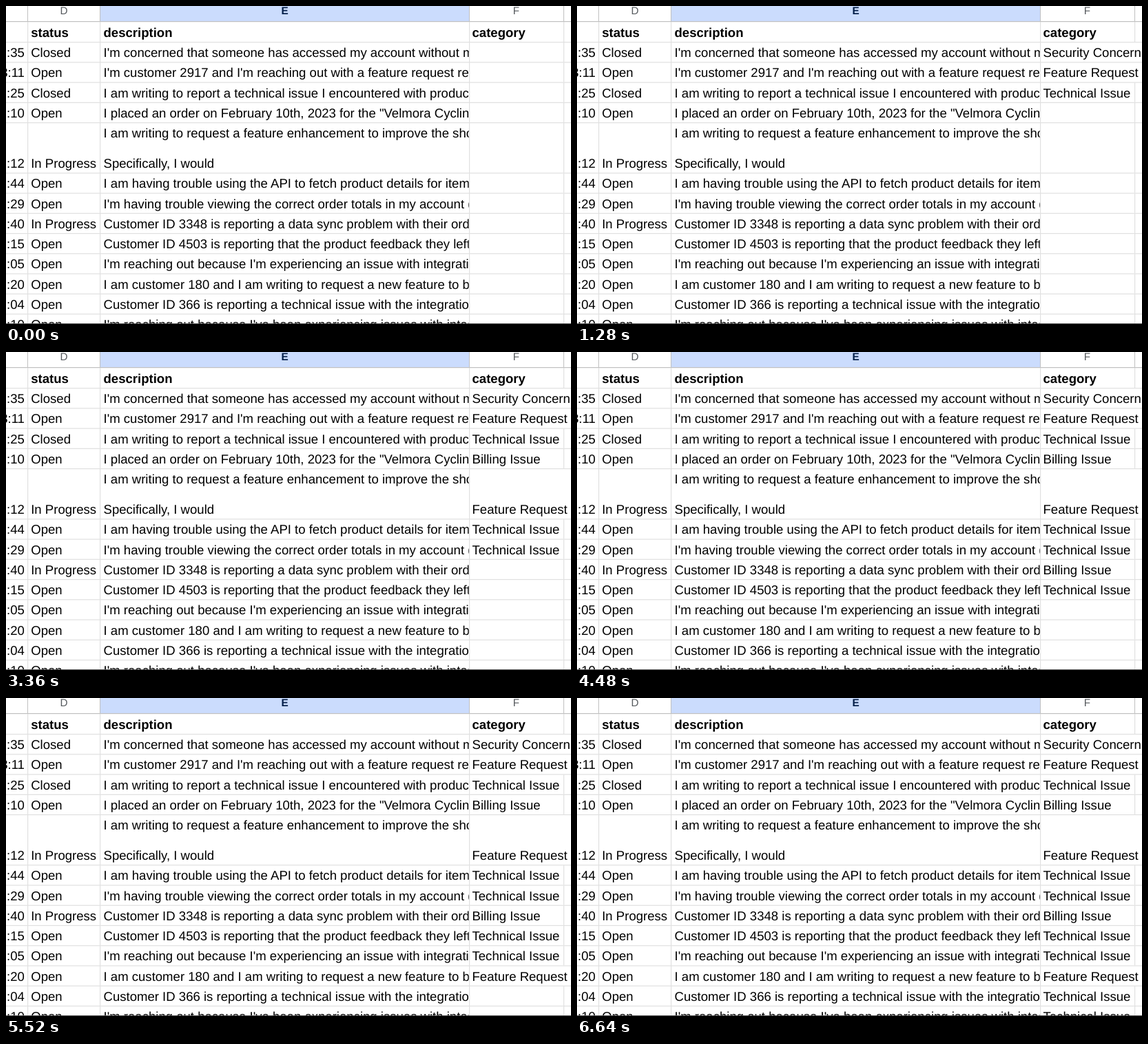
These frames come from a looping animation (820x462 px, 7680 ms). An HTML page:

```html
<!DOCTYPE html>
<html lang="en">
<head>
<meta charset="utf-8">
<title>Ticket categories</title>
<style>
  html, body { margin: 0; width: 100%; height: 100%; overflow: hidden; background: #fff; }
  svg { display: block; width: 820px; height: 462px; font: 18.57px "Liberation Sans", Arial, sans-serif; text-rendering: geometricPrecision; }
  .bold { font-weight: 700; }
  .letter { font-size: 15.3px; text-anchor: middle; fill: #575b5f; }
  .selected { font-weight: 700; fill: #041e49; }
</style>
</head>
<body>
<svg id="sheet" viewBox="0 0 820 462">
  <clipPath id="cellE"><rect x="137" width="534.7" height="462"/></clipPath>
</svg>
<script>
const LOOP = 7680, PITCH = 29.25, TALL = 73.2;
const COLUMNS = [31, 136, 672, 809];
const sheet = document.getElementById('sheet');

// time, status, [description lines], category, moment the category appears
const tickets = [
  [':35', 'Closed', ["I'm concerned that someone has accessed my account without my"], 'Security Concern', 80],
  ['3:11', 'Open', ["I'm customer 2917 and I'm reaching out with a feature request related"], 'Feature Request', 640],
  [':25', 'Closed', ['I am writing to report a technical issue I encountered with product'], 'Technical Issue', 1280],
  [':10', 'Open', ['I placed an order on February 10th, 2023 for the "Velmora Cycling'], 'Billing Issue', 1760],
  [':12', 'In Progress', ['I am writing to request a feature enhancement to improve the shopping', 'Specifically, I would'], 'Feature Request', 2320],
  [':44', 'Open', ['I am having trouble using the API to fetch product details for item'], 'Technical Issue', 2800],
  [':29', 'Open', ["I'm having trouble viewing the correct order totals in my account dashboard"], 'Technical Issue', 3360],
  [':40', 'In Progress', ['Customer ID 3348 is reporting a data sync problem with their order'], 'Billing Issue', 3920],
  [':15', 'Open', ['Customer ID 4503 is reporting that the product feedback they left'], 'Technical Issue', 4480],
  [':05', 'Open', ["I'm reaching out because I'm experiencing an issue with integrating"], 'Technical Issue', 4960],
  [':20', 'Open', ['I am customer 180 and I am writing to request a new feature to better'], 'Feature Request', 5520],
  [':04', 'Open', ['Customer ID 366 is reporting a technical issue with the integration'], 'Technical Issue', 6080],
  [':10', 'Open', ["I'm reaching out because I've been experiencing issues with integrating"], 'Technical Issue', 6640]
];

function add(tag, attrs, content = '') {
  const node = document.createElementNS('http://www.w3.org/2000/svg', tag);
  for (const name in attrs) node.setAttribute(name, attrs[name]);
  node.textContent = content;
  return sheet.appendChild(node);
}
const box = (x, y, width, height, fill) => add('rect', { x, y, width, height, fill });
const label = (x, y, content, attrs) => add('text', { x, y, ...attrs }, content);

// Column letters
box(137, 0, 535, 22, '#cbdcfd');
COLUMNS.forEach(x => box(x, 0, 1, 22, '#c0c0c0'));
box(0, 22, 820, 1.2, '#c0c0c0');
label(84, 11.6, 'D', { class: 'letter' });
label(404.5, 11.6, 'E', { class: 'letter selected' });
label(740.5, 11.6, 'F', { class: 'letter' });

// Grid and title row
COLUMNS.slice(0, 3).forEach(x => box(x, 23, 1.2, 439, '#e0e0e0'));
box(809, 23, 1.2, 29, '#e0e0e0');
box(0, 52, 820, 1.2, '#e0e0e0');
label(36.2, 44.8, 'status', { class: 'bold' });
label(141.5, 44.8, 'description', { class: 'bold' });
label(676.5, 44.8, 'category', { class: 'bold' });

let rowTop = 52;
const cells = tickets.map(([time, status, lines, category, start]) => {
  const height = lines.length > 1 ? TALL : PITCH;
  const base = rowTop + height - 7.1;
  const firstBase = rowTop + PITCH - 7.1;
  box(0, rowTop + height, 820, 1.2, '#e0e0e0');
  const edge = box(809, rowTop + 1, 1.2, height - 1, '#e0e0e0');
  label(26.9, base, time, { 'text-anchor': 'end' });
  label(36.2, base, status);
  lines.forEach((line, i) => label(141.5, i ? base : firstBase, line, { 'clip-path': 'url(#cellE)' }));
  const text = label(676.5, base, category);
  rowTop += height;
  return { text, edge, start, overflows: /Concern|Request/.test(category) };
});
box(0, 461, 820, 1, '#555');

function draw() {
  const t = performance.now() % LOOP;
  for (const { text, edge, start, overflows } of cells) {
    const shown = t >= start;
    text.style.visibility = shown ? 'visible' : 'hidden';
    edge.style.visibility = shown && overflows ? 'hidden' : 'visible';
  }
  requestAnimationFrame(draw);
}
draw();
</script>
</body>
</html>
```
